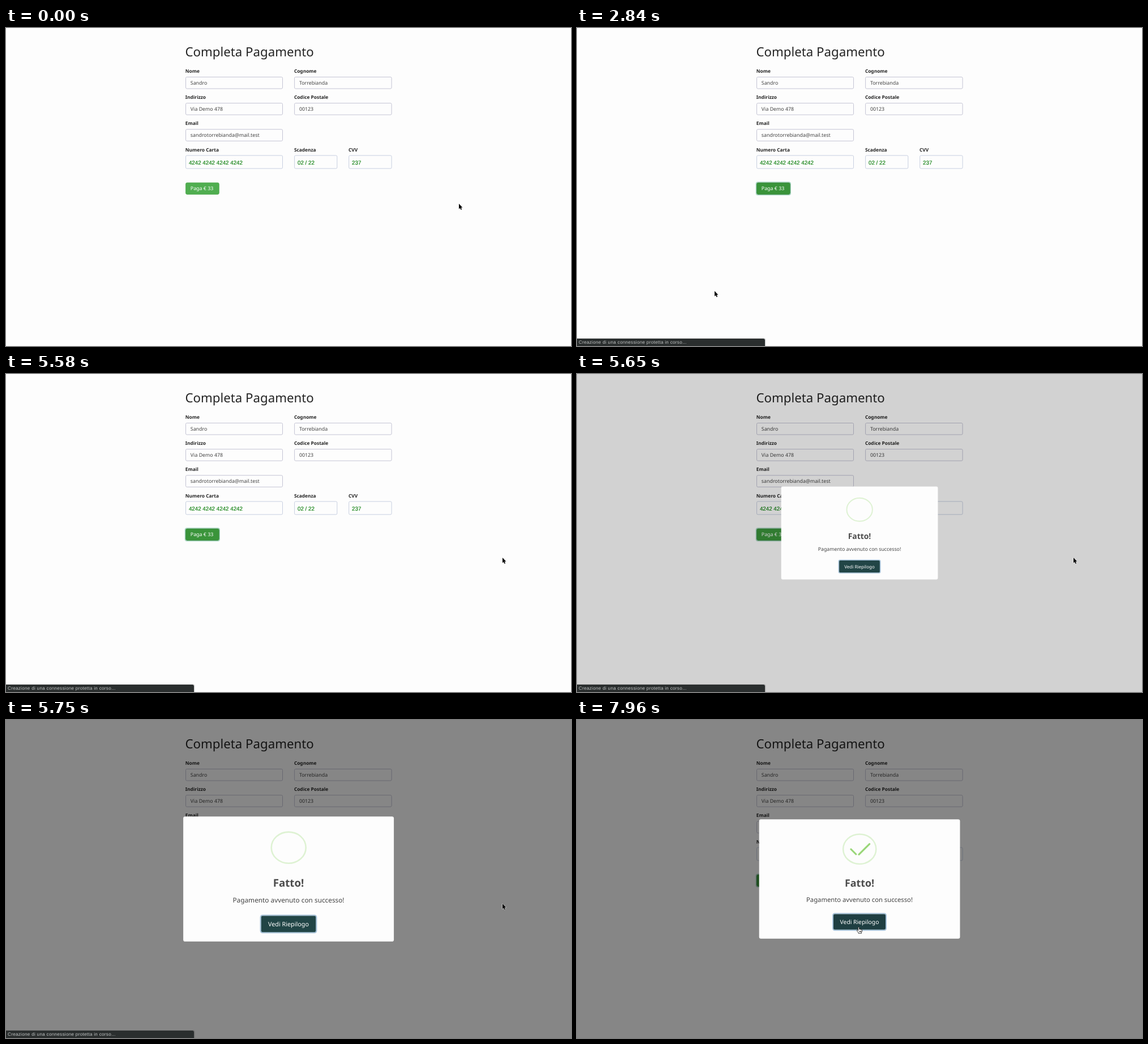
Recreate the animation shown at these times as an HTML page. Size 998x561 px, loop 7990 ms.

```html
<!DOCTYPE html>
<html lang="it">
<head>
<meta charset="utf-8">
<title>Completa Pagamento</title>
<style>
html, body { margin: 0; width: 100%; height: 100%; overflow: hidden; background: #fdfdfd; }
svg { display: block; width: 998px; height: 561px; }
text { font-family: "Noto Sans", "Open Sans", sans-serif; white-space: pre; text-rendering: geometricPrecision; }
.title { font-size: 22.25px; fill: #242424; }
.label { font-size: 8.35px; font-weight: 700; fill: #242424; }
.value { font-size: 8.85px; fill: #444; }
.card { font: 9.78px "Liberation Sans", Arial, sans-serif; fill: #0a7d0a; stroke: #0a7d0a; stroke-width: .15px; }
.field { fill: #fdfdfd; stroke: #c4c4d4; }
.field.card-box { stroke: #c8cfe0; }
.white { fill: #fff; }
.status { font: 8.1px "Liberation Sans", Arial, sans-serif; letter-spacing: .3px; fill: #c4c7c7; }
.mid { text-anchor: middle; }
</style>
</head>
<body>
<svg viewBox="0 0 998 561">
  <rect width="998" height="561" fill="#fdfdfd"/>
  <text class="title" x="316.5" y="50">Completa Pagamento</text>
  <g id="form"></g>
  <rect id="payRing" x="316.4" y="271.9" width="60.9" height="22.6" rx="3.2" fill="none" stroke="#a3d3c0" stroke-width="1.4"/>
  <rect id="pay" x="317.5" y="273" width="58.8" height="20.4" rx="2.4" stroke-width=".8"/>
  <text class="value white" x="325.8" y="286">Paga € 33</text>

  <rect id="shade" width="998" height="561" fill="#000"/>
  <g id="modal">
    <rect x="321.7" y="175.3" width="354.8" height="210.4" rx="3.2" fill="#fdfdfd"/>
    <ellipse cx="499.2" cy="227.7" rx="29.1" ry="26.3" fill="none" stroke="#def2d3" stroke-width="2.5"/>
    <rect id="tip" height="3.1" rx="1.3" fill="#99d678"/>
    <rect id="long" height="3.1" rx="1.3" fill="#99d678"/>
    <text class="mid" x="499" y="293.6" font-size="17.8" font-weight="700" fill="#4c4c4c">Fatto!</text>
    <text class="mid" x="499" y="320.5" font-size="11.25" fill="#444">Pagamento avvenuto con successo!</text>
    <rect x="452" y="341.6" width="94" height="29.2" rx="3.2" fill="none" stroke="#a3c0d8" stroke-width="2"/>
    <rect id="recap" x="453" y="342.6" width="92" height="27.2" rx="2.2"/>
    <text class="mid white" x="499" y="360" font-size="10.3">Vedi Riepilogo</text>
  </g>

  <g id="status">
    <path d="M0 547H330Q333.5 547 333.5 550.5V561H0Z" fill="#000" opacity=".14"/>
    <path d="M0 548H329Q332 548 332 551V561H0Z" fill="#2a2e2e"/>
    <text class="status" x="3" y="557.3">Creazione di una connessione protetta in corso...</text>
  </g>

  <g id="cursor">
    <path id="arrow" d="M0 0V9.3L2.1 7.4L3.5 10.7L5.1 10L3.7 6.8H6.4Z" fill="#000" stroke="#fff" stroke-width="1" paint-order="stroke" stroke-linejoin="round"/>
    <path id="hand" d="M-1.1 5.8V.9Q-1.1 0 -.2 0T.8 .9V4Q1.7 3.3 2.5 4.2Q3.5 3.5 4.2 4.6Q5.8 4.2 5.8 5.8V7.6L4.8 9.4V11H-.7V9.8L-2.9 7.2Q-3.9 5.8 -3 5.3Q-2.2 5 -1.1 6.4ZM1.2 6.6V9M2.7 6.6V9M4.1 6.6V9" fill="#fff" stroke="#111" stroke-width=".8" stroke-linejoin="round"/>
  </g>
</svg>
<script>
const LOOP = 7990;
const CLICK = 1970, STATUS_ON = 2370, STATUS_OFF = 5900, MODAL = 5628;
const $ = id => document.getElementById(id);
const set = (id, attrs) => {
  for (const k in attrs) $(id).setAttribute(k, attrs[k]);
};
const show = (id, on) => set(id, { visibility: on ? "visible" : "hidden" });
const clamp = v => Math.min(1, Math.max(0, v));

// label, value, x, y, width, card field
const fields = [
  ["Nome", "Sandro", 317.5, 86.5, 171],
  ["Cognome", "Torrebianda", 509.6, 86.5, 171.5],
  ["Indirizzo", "Via Demo 478", 317.5, 132.6, 171],
  ["Codice Postale", "00123", 509.6, 132.6, 171.5],
  ["Email", "sandrotorrebianda@mail.test", 317.5, 178.8, 171],
  ["Numero Carta", "4242 4242 4242 4242", 317.5, 224.9, 171, true],
  ["Scadenza", "02 / 22", 509.6, 224.9, 75.2, true],
  ["CVV", "237", 605.7, 224.9, 75.4, true]
];
$("form").innerHTML = fields.map(([label, value, x, y, w, card]) => `
  <text class="label" x="${x - .7}" y="${y - 7.4}">${label}</text>
  <rect class="field ${card ? "card-box" : ""}" x="${x}" y="${y}" width="${w}" height="${card ? 23 : 20.5}" rx="2"/>
  <text class="${card ? "card" : "value"}" x="${x + (card ? 5.4 : 8.3)}" y="${y + (card ? 15.6 : 13.5)}">${value}</text>`).join("");

// cubic-bezier(.25, .1, .25, 1)
function ease(x) {
  const bez = (a, b, u) => 3 * a * u * (1 - u) ** 2 + 3 * b * u * u * (1 - u) + u ** 3;
  let lo = 0, hi = 1;
  for (let i = 0; i < 20; i++) {
    const u = (lo + hi) / 2;
    if (bez(.25, .25, u) < x) lo = u; else hi = u;
  }
  return bez(.1, 1, lo);
}

// keys: [position, ...values], eased within each span
function keyed(keys, p) {
  const i = Math.max(1, keys.findIndex(k => k[0] >= p));
  const a = keys[i - 1], b = keys[i];
  const u = ease(clamp((p - a[0]) / (b[0] - a[0])));
  return a.slice(1).map((v, n) => v + (b[n + 1] - v) * u);
}

const POP = [[0, .7], [.45, 1.05], [.8, .95], [1, 1]];
// left, top, width in em
const TIP = [[0, .0625, 1.1875, 0], [.54, .125, 1.0625, 0], [.7, -.375, 2.1875, 3.125],
  [.84, 1.3125, 3, 1.0625], [1, .875, 2.8125, 1.5625]];
// right, top, width in em
const LONG = [[0, 2.875, 3.375, 0], [.65, 2.875, 3.375, 0], [.84, 0, 2.1875, 3.4375], [1, .5, 2.375, 2.9375]];

function stroke(id, x, y, w, angle) {
  set(id, { x, y, width: w, transform: `rotate(${angle} ${x + w / 2} ${y + 1.55})` });
}

function drawCheck(p) {
  const em = 10, left = 471.8, right = 527, top = 202.7;
  const [tx, ty, tw] = keyed(TIP, p).map(v => v * em);
  const [lx, ly, lw] = keyed(LONG, p).map(v => v * em);
  stroke("tip", left + tx, top + ty, tw, 45);
  stroke("long", right - lx - lw, top + ly, lw, -45);
}

// time, x, y
const PATH = [
  [0, 800, 310], [400, 766, 318], [800, 677, 303], [1250, 420, 290], [1580, 340, 290], [2370, 340, 290],
  [3120, 199, 543], [3170, 199, 543], [3780, 841.5, 415], [3940, 869, 363], [4480, 877, 324],
  [6620, 877, 324], [7390, 541, 366], [7950, 497.7, 365.3], [LOOP, 497.7, 365.3]
];

// smooth through moving points, at rest beside holds
function slope(i, n) {
  const a = PATH[i - 1], b = PATH[i], c = PATH[i + 1];
  const still = (p, q) => !p || !q || (p[1] === q[1] && p[2] === q[2]);
  return still(a, b) || still(b, c) ? 0 : (c[n] - a[n]) / (c[0] - a[0]);
}

function pointer(t) {
  const i = Math.max(1, PATH.findIndex(k => k[0] >= t));
  const a = PATH[i - 1], b = PATH[i], d = b[0] - a[0], u = (t - a[0]) / d;
  const s = u * u * (3 - 2 * u);
  return [1, 2].map(n => a[n] + (b[n] - a[n]) * s
    + d * u * (1 - u) * ((1 - u) * slope(i - 1, n) - u * slope(i, n)));
}

function draw(t) {
  const [x, y] = pointer(t);
  const inside = (l, r, top, bottom) => x > l && x < r && y > top && y < bottom;
  const open = t >= MODAL;
  const overPay = !open && inside(317, 376.5, 273, 293.5);
  const overRecap = open && inside(453, 545, 342, 370);
  const clicked = t >= CLICK;

  set("pay", overPay || clicked
    ? { fill: "#3a943a", stroke: "#34863a" }
    : { fill: "#50ae50", stroke: "#4ca84c" });
  show("payRing", clicked);

  const age = t - MODAL;
  set("shade", { opacity: .47 * ease(clamp(age / 100)) });
  show("modal", open);
  if (open) {
    const [k] = keyed(POP, clamp(age / 300));
    set("modal", { transform: `translate(499 280.5) scale(${k}) translate(-499 -280.5)` });
    set("recap", { fill: overRecap ? "#1f3f42" : "#214546" });
    drawCheck(clamp(age / 750));
  }

  show("status", t >= STATUS_ON && t < STATUS_OFF);
  const hand = overPay || overRecap;
  show("hand", hand);
  show("arrow", !hand);
  set("cursor", { transform: `translate(${x} ${y})` });
}

function tick() {
  draw(performance.now() % LOOP);
  requestAnimationFrame(tick);
}
tick();
</script>
</body>
</html>
```
